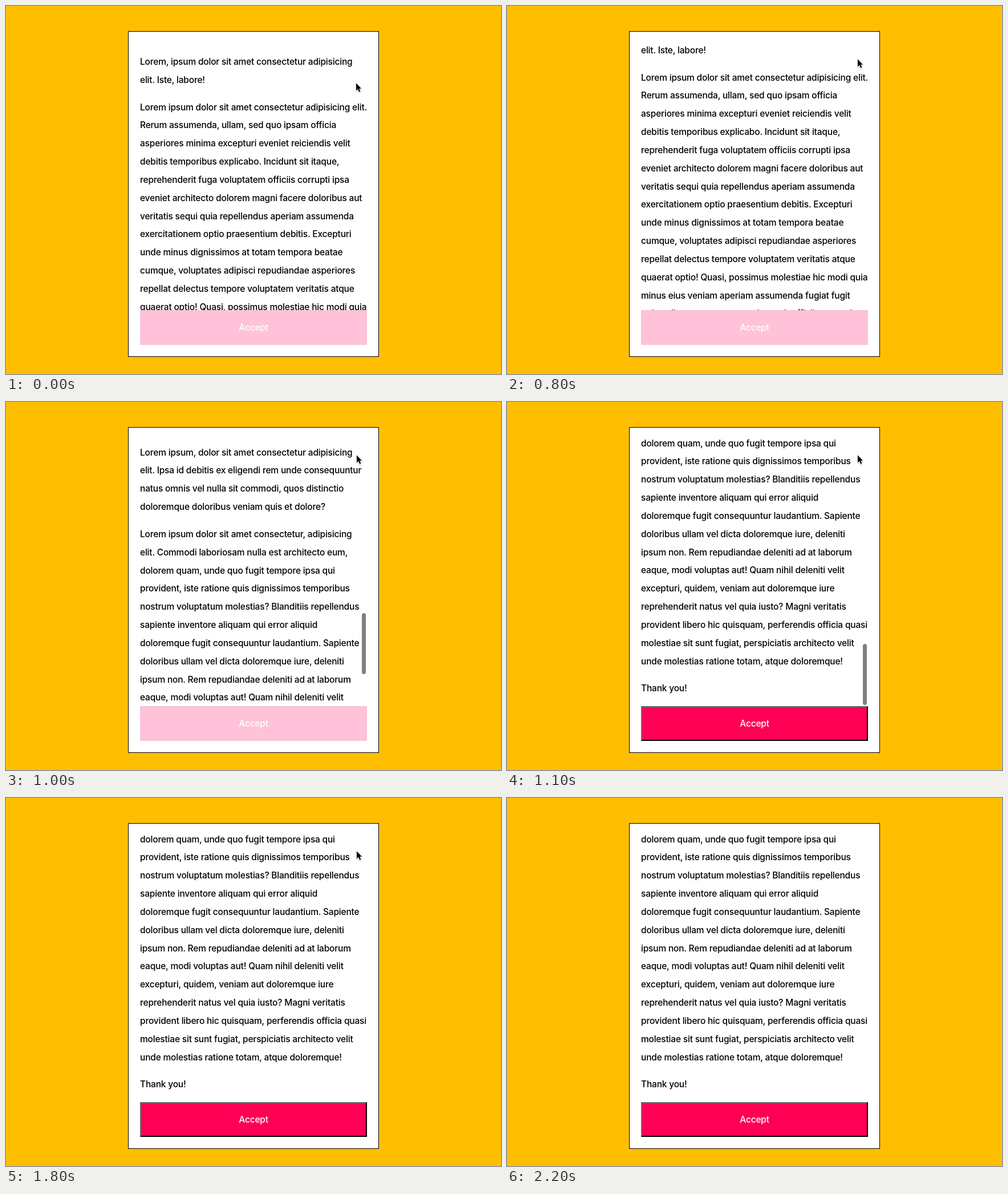
An HTML page for the animation above (2600 ms loop, 868 by 645 pixels).

```html
<!DOCTYPE html>
<html lang="en">
<head>
<meta charset="utf-8">
<title>Scroll to accept</title>
<style>
  :root { --loop: 2600ms step-end infinite; --track: -0.22px; }
  * { box-sizing: border-box; }
  html, body { margin: 0; width: 100%; height: 100%; overflow: hidden; }
  body {
    position: relative;
    background: #ffbf00;
    color: #000;
    font: 450 15.5px/31.85px Inter, Roboto, sans-serif;
    letter-spacing: var(--track);
  }
  .terms {
    position: absolute; left: 214px; top: 44px;
    width: 440px; height: 571px;
    background: #fff; border: 1px solid #000;
  }
  .view {
    position: absolute; left: 20px; top: 20px;
    width: 398px; height: 468px; overflow: hidden;
  }
  .text { display: flow-root; animation: scroll var(--loop); }
  .text p { position: relative; top: 1px; margin: 15.92px 0; white-space: pre; }
  .thumb {
    position: absolute; left: 389px; top: 0;
    width: 7px; height: 107px; border-radius: 4px;
    background: #808080;
    animation: thumb var(--loop);
  }
  .accept {
    position: absolute; left: 20px; top: 488px;
    width: 398px; height: 61px;
    border: 2px solid;
    color: #fff; text-align: center; line-height: 57px;
    animation: enable var(--loop);
  }
  .cursor {
    position: absolute; left: 611px; top: 90px;
    width: 20px; height: 26px; overflow: visible;
    filter: drop-shadow(0 1px 1px rgba(0, 0, 0, .3));
    animation: cursor var(--loop);
  }

  @keyframes scroll {
    0% { transform: translateY(0); }
    30.76% { transform: translateY(-52px); }
    34.61% { transform: translateY(-650px); }
    38.46% { transform: translateY(-1299px); }
    42.3%, 100% { transform: translateY(-1522px); }
  }
  @keyframes thumb {
    0% { transform: translateY(2px); opacity: 0; }
    34.61% { transform: translateY(153px); opacity: 1; }
    38.46% { transform: translateY(305px); opacity: 1; }
    42.3% { transform: translateY(359px); opacity: 1; }
    61.53% { transform: translateY(359px); opacity: .65; }
    65.38% { transform: translateY(359px); opacity: .25; }
    69.23%, 100% { transform: translateY(359px); opacity: 0; }
  }
  @keyframes enable {
    0% { background: #ffc2d9; border-color: #f6c3d7; }
    42.3%, 100% { background: #ff0055; border-color: #6b6b6b #000 #000 #6b6b6b; }
  }
  @keyframes cursor {
    0% { transform: translate(-1px, 42px); opacity: 1; }
    3.84% { transform: translate(0, 28px); opacity: 1; }
    7.69% { transform: translate(0, 8px); opacity: 1; }
    11.53% { transform: translate(0, 0); opacity: 1; }
    76.92%, 100% { transform: translate(0, 0); opacity: 0; }
  }
</style>
</head>
<body>
<div class="terms">
  <div class="view">
    <div class="text">
<p>Lorem, ipsum dolor sit amet consectetur adipisicing
elit. Iste, labore!</p>
<p id="body">Lorem ipsum dolor sit amet consectetur adipisicing elit.
Rerum assumenda, ullam, sed quo ipsam officia
asperiores minima excepturi eveniet reiciendis velit
debitis temporibus explicabo. Incidunt sit itaque,
reprehenderit fuga voluptatem officiis corrupti ipsa
eveniet architecto dolorem magni facere doloribus aut
veritatis sequi quia repellendus aperiam assumenda
exercitationem optio praesentium debitis. Excepturi
unde minus dignissimos at totam tempora beatae
cumque, voluptates adipisci repudiandae asperiores
repellat delectus tempore voluptatem veritatis atque
quaerat optio! Quasi, possimus molestiae hic modi quia
minus eius veniam aperiam assumenda fugiat fugit
quia nulla rerum eaque possimus ab officiis earum in
voluptas quod. Natus saepe dolores aspernatur
numquam iure tenetur, animi culpa ducimus sint
accusamus rem fugiat nihil. Maxime soluta quis
voluptatum eum harum minima?</p>
<p>Lorem ipsum dolor sit amet consectetur adipisicing
elit. Neque quidem ipsum vitae, nobis dolore odio
sapiente maiores illum ratione. Quam tempora, nisi
laborum placeat autem beatae veniam, itaque sunt
cupiditate facilis error dolorum. Omnis magnam
perspiciatis enim sequi, quos alias deserunt eius
voluptate blanditiis? Consequatur id iusto libero
repellendus fugit, molestias eveniet nam suscipit
provident ea aliquam. Totam dicta corporis minus
architecto ut, nesciunt quae inventore officia
laudantium pariatur. Vero recusandae expedita
natus labore, sit quisquam velit explicabo modi
doloribus impedit. Debitis aut similique fuga
perferendis, ullam cumque tempore aperiam nulla
quibusdam voluptas! Eligendi rerum adipisci hic
molestiae ipsa, porro delectus magni commodi
assumenda dolorem vel. Unde asperiores ad optio
reiciendis quasi, temporibus atque mollitia eos
necessitatibus incidunt?</p>
<p>Lorem ipsum, dolor sit amet consectetur adipisicing
elit. Ipsa id debitis ex eligendi rem unde consequuntur
natus omnis vel nulla sit commodi, quos distinctio
doloremque doloribus veniam quis et dolore?</p>
<p>Lorem ipsum dolor sit amet consectetur, adipisicing
elit. Commodi laboriosam nulla est architecto eum,
dolorem quam, unde quo fugit tempore ipsa qui
provident, iste ratione quis dignissimos temporibus
nostrum voluptatum molestias? Blanditiis repellendus
sapiente inventore aliquam qui error aliquid
doloremque fugit consequuntur laudantium. Sapiente
doloribus ullam vel dicta doloremque iure, deleniti
ipsum non. Rem repudiandae deleniti ad at laborum
eaque, modi voluptas aut! Quam nihil deleniti velit
excepturi, quidem, veniam aut doloremque iure
reprehenderit natus vel quia iusto? Magni veritatis
provident libero hic quisquam, perferendis officia quasi
molestiae sit sunt fugiat, perspiciatis architecto velit
unde molestias ratione totam, atque doloremque!</p>
<p>Thank you!</p>
    </div>
    <div class="thumb"></div>
  </div>
  <div class="accept">Accept</div>
</div>
<svg class="cursor" viewBox="0 0 20 26">
  <path d="M4 3.2V16.2L7 13.5L9.2 18.6L11.4 17.7L9.2 12.7H13Z"
        fill="#000" stroke="#fff" stroke-width="1.6" stroke-linejoin="round" paint-order="stroke"/>
</svg>
<script>
  // One tracking value for all text: the opening line fills the column.
  const pen = document.createElement('canvas').getContext('2d');
  pen.font = '450 15.5px Inter, Roboto, sans-serif';
  const line = document.getElementById('body').textContent.split('\n')[0];
  const column = document.querySelector('.view').clientWidth;
  const track = (column - pen.measureText(line).width) / line.length;
  document.documentElement.style.setProperty('--track', track.toFixed(3) + 'px');
</script>
</body>
</html>
```
